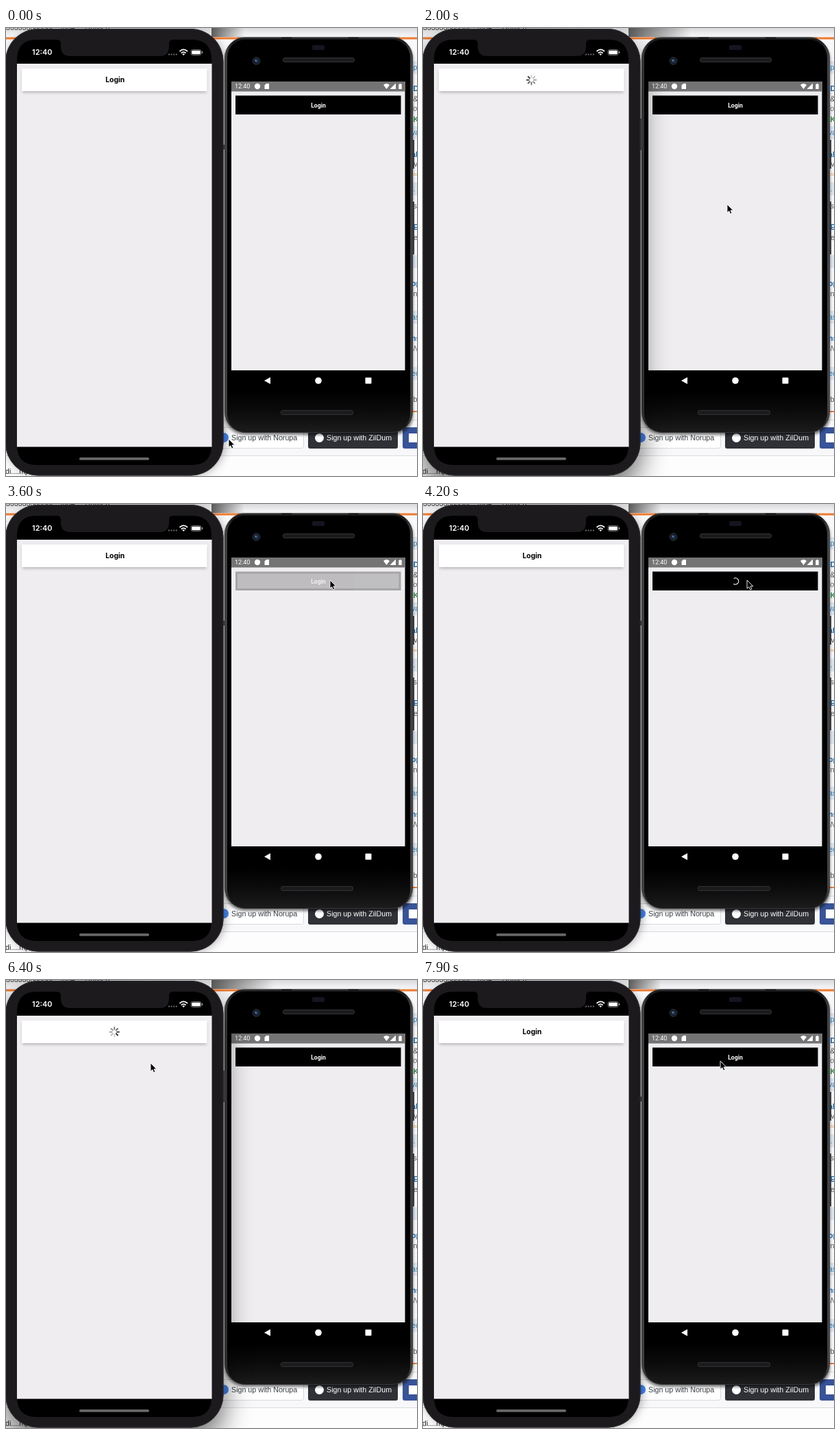
Write an HTML page that moves like this. It is 600 px wide and 653 px high and loops after 8 s.

```html
<!DOCTYPE html>
<html lang="en">
<head>
<meta charset="utf-8">
<title>Login button on two phones</title>
<style>
  html, body { margin: 0; width: 100%; height: 100%; overflow: hidden; background: #f8f8fa; }
  svg { display: block; width: 600px; height: 653px; }
  text { white-space: pre; }
  .page { font: 10.7px "Liberation Sans", Arial, sans-serif; }
  .ios { font-family: Inter, sans-serif; font-weight: 600; }
  .droid { font-family: Roboto, sans-serif; }
</style>
</head>
<body>
<svg viewBox="0 0 600 653">
  <defs>
    <filter id="wide" x="-50%" y="-30%" width="200%" height="160%"><feGaussianBlur stdDeviation="21"/></filter>
    <filter id="tight" x="-50%" y="-30%" width="200%" height="160%"><feGaussianBlur stdDeviation="8"/></filter>
    <filter id="soft" x="-20%" y="-40%" width="140%" height="200%"><feGaussianBlur stdDeviation="2.2"/></filter>
    <linearGradient id="topShade">
      <stop offset="0" stop-color="#000" stop-opacity=".6"/>
      <stop offset="1" stop-color="#000" stop-opacity="0"/>
    </linearGradient>
    <linearGradient id="strip" x2="0" y2="1">
      <stop offset="0" stop-color="#d9d9db"/>
      <stop offset=".7" stop-color="#f1f1f3"/>
    </linearGradient>
    <linearGradient id="chin" x2="0" y2="1">
      <stop offset="0" stop-color="#000"/>
      <stop offset=".5" stop-color="#0b0b0c"/>
      <stop offset="1" stop-color="#1a1a1b"/>
    </linearGradient>
    <linearGradient id="rim" x2="1" y2="0">
      <stop offset="0" stop-color="#48484a"/>
      <stop offset=".04" stop-color="#1b1b1c"/>
      <stop offset=".96" stop-color="#1b1b1c"/>
      <stop offset="1" stop-color="#4a4a4c"/>
    </linearGradient>
  </defs>

  <g class="page">
    <rect width="600" height="653" fill="#f8f8fa"/>
    <rect width="600" height="14" fill="url(#strip)"/>
    <rect y="13.5" width="600" height="3" fill="#ee7b30"/>
    <text x="0" y="3" fill="#333">3333333333di....mp4     Untitled....</text>
    <g id="column"></g>
    <rect x="590" y="558" width="10" height="2" fill="#ee7b30"/>
    <path d="M318 571.5H600" stroke="#dcdee1"/>
    <rect y="623" width="600" height="30" fill="#fdfdfe"/>
    <path d="M0 623.5H600" stroke="#d9dbdf"/>
    <rect x="300.5" y="582.5" width="134" height="30" rx="3" fill="#fff" stroke="#d6d9dc"/>
    <circle cx="318" cy="597" r="7" fill="#4285f4"/>
    <text x="329" y="601" fill="#3b4045">Sign up with Norupa</text>
    <rect x="441" y="582" width="131" height="31" rx="3" fill="#2f3136"/>
    <circle cx="457.500" cy="597.500" r="6.500" fill="#fff"/>
    <text x="468" y="601" fill="#fff">Sign up with ZilDum</text>
    <rect x="579" y="582" width="40" height="31" rx="3" fill="#385499"/>
    <rect x="588" y="591" width="13" height="13" fill="#fff"/>
    <text x="-1" y="650" fill="#222">di....mp4</text>
  </g>

  <g id="idleShade">
    <rect x="3" y="8" width="314" height="642" rx="48" filter="url(#tight)" opacity=".5"/>
    <rect x="300" width="48" height="13" fill="url(#topShade)"/>
  </g>

  <g class="droid">
    <rect x="320" y="18" width="274" height="575" rx="28" filter="url(#soft)" opacity=".55"/>
    <path d="M594.500 163V205M594.500 253V330" stroke="#3c3c3e" stroke-width="3"/>
    <rect x="319.500" y="13.500" width="274" height="576" rx="30" fill="url(#rim)" stroke="#38383a"/>
    <path d="M338 14H402M417 14H500M515 14H575" stroke="#69696b"/>
    <rect x="323" y="17" width="267" height="569" rx="26"/>
    <path d="M323 530H590V560Q590 586 564 586H349Q323 586 323 560Z" fill="url(#chin)"/>
    <rect x="447" y="25" width="18" height="7" rx="2" fill="#17141f"/>
    <circle cx="365.500" cy="48" r="5.500" fill="#17202e" stroke="#29292d"/>
    <circle cx="365.500" cy="48" r="2.200" fill="#29466f"/>
    <circle cx="364.500" cy="47" r="1" fill="#6e91bd"/>
    <g fill="#1b1b1d" stroke="#333336">
      <rect x="404.500" y="43.500" width="104" height="6" rx="2.500"/>
      <rect x="401.500" y="557.500" width="105" height="6" rx="2.500"/>
    </g>
    <rect x="329" y="78" width="253.500" height="421" fill="#efedf0"/>
    <rect x="329" y="78" width="253.500" height="14.500" fill="#757475"/>
    <g fill="#fff">
      <text x="334" y="88.300" font-size="9">12:40</text>
      <circle cx="367" cy="85" r="4.200"/>
      <path d="M380 81H384V89H377.500V83.500Z"/>
      <path d="M551 83Q555.500 79 560 83L555.500 89Z"/>
      <path d="M569 80.500V89H560.500Z"/>
      <path d="M573.300 82H574.500V81H576.500V82H577.700V89H573.300Z"/>
      <path d="M386 509V519L377 514Z"/>
      <circle cx="456" cy="514" r="4.800"/>
      <rect x="524.500" y="509.500" width="9" height="9" rx="1"/>
    </g>
    <g id="droidButton">
      <rect x="335" y="98.500" width="241.500" height="27.500"/>
      <text id="droidLabel" x="456" y="116" font-size="8.700" font-weight="700" fill="#fff" text-anchor="middle">Login</text>
      <circle id="droidSpin" cx="456" cy="112.500" r="4.700" fill="none" stroke="#fff" stroke-width="1.200"/>
    </g>
    <rect id="droidRim" x="336.500" y="100" width="238.500" height="24.500" fill="none" stroke="#000" stroke-width="3" opacity=".13"/>
  </g>

  <g id="activeShade">
    <rect x="-1" y="20" width="318" height="651" rx="50" filter="url(#wide)" opacity=".6"/>
    <rect x="300" width="92" height="13" fill="url(#topShade)"/>
    <rect x="316" y="132" width="4.500" height="46" rx="1.500" fill="#39393b"/>
  </g>

  <g class="ios">
    <rect x="316" y="170" width="4" height="7" fill="#39393b"/>
    <rect x="-1" y="1" width="318.500" height="651.500" rx="48" fill="#1c1a1d"/>
    <rect x="-.5" y="1.500" width="317.500" height="650.500" rx="47.500" fill="none" stroke="#333135"/>
    <path d="M16 52V46Q16 17 45 17H74Q80 17 80 23V27Q80 41 94 41H224Q238 41 238 27V23Q238 17 244 17H271Q300 17 300 46V608Q300 637 271 637H45Q16 637 16 608Z"/>
    <rect x="16" y="52" width="284.500" height="558.500" fill="#efedf0"/>
    <rect x="107" y="626" width="102" height="3.800" rx="1.900" fill="#69676a"/>
    <text x="38" y="39.300" font-size="11" fill="#fff">12:40</text>
    <path d="M237 38.500H250" stroke="#6b6b6b" stroke-width="2" stroke-dasharray="2 1.600"/>
    <g fill="none" stroke="#fff" stroke-width="1.700">
      <path d="M253.500 34Q259.200 28.800 265 34M255.800 36.600Q259.200 33.600 262.600 36.600"/>
    </g>
    <path d="M257.300 38Q259.200 36.400 261.100 38L259.200 40Z" fill="#fff"/>
    <rect x="270" y="31.500" width="15" height="8" rx="2.300" fill="none" stroke="#8a8a8a" stroke-width=".8"/>
    <rect x="271.200" y="32.700" width="12.600" height="5.600" rx="1.300" fill="#fff"/>
    <path d="M286.500 34V37" stroke="#aaa" stroke-width="1.200"/>
    <g id="iosButton">
      <rect x="24" y="61" width="268.500" height="33" filter="url(#soft)" opacity=".24"/>
      <rect x="23" y="59" width="270.500" height="33" fill="#fff"/>
      <text id="iosLabel" x="159.300" y="79.200" font-size="10.400" font-weight="700" text-anchor="middle">Login</text>
      <g id="iosSpin" transform="translate(158.300 75.700)" stroke-width="1.900" stroke-linecap="round"></g>
    </g>
  </g>

  <path id="cursor" d="M0 0V12.200L2.800 9.700L4.700 14L6.900 13L5 8.900H8.800Z" stroke="#fff" stroke-width=".9"/>
</svg>
<script>
const LOOP = 8000;
const $ = id => document.getElementById(id);
const show = (id, on) => $(id).setAttribute('visibility', on ? 'visible' : 'hidden');
const within = (t, spans) => spans.some(([from, to]) => t >= from && t < to);
const clamp = v => Math.max(0, Math.min(1, v));

function add(parent, tag, attrs, text = '') {
  const node = document.createElementNS('http://www.w3.org/2000/svg', tag);
  for (const key in attrs) node.setAttribute(key, attrs[key]);
  node.textContent = text;
  parent.append(node);
  return node;
}

// Clipped page text to the right of the phones: baseline, text, style.
const styles = {
  tag: { fill: '#2f7fb8' },
  link: { fill: '#0a66b5', 'font-weight': 700 },
  note: { fill: '#666', 'font-style': 'italic' },
  body: { fill: '#555' },
  good: { fill: '#2f8f45', 'font-weight': 700 },
  warm: { fill: '#f0a040' }
};
[
  [61, 'p', 'tag'], [92, 'D', 'link'], [107, '&', 'body'], [121, 'lo', 'note'],
  [137, 'K', 'good'], [156, 'va', 'tag'], [188, 'al', 'link'], [202, 'V', 'body'],
  [217, '≈', 'warm'], [238, '.', 'tag'], [263, 's', 'body'], [294, 'E', 'link'],
  [309, 'te', 'body'], [344, ' ', 'tag'], [376, 'op', 'link'], [391, 'n', 'body'],
  [425, 'as', 'tag'], [456, 'ns', 'link'], [471, 'N', 'note'], [507, 'ed', 'tag'], [545, 'b', 'body']
].forEach(([y, text, kind]) => {
  if (kind === 'tag') add($('column'), 'rect', { x: 585, y: y - 13, width: 15, height: 19, fill: '#dbe7f2' });
  add($('column'), 'text', { x: text.length > 1 ? 592 : 594.5, y, ...styles[kind] }, text);
});

const spokes = Array.from({ length: 8 }, (_, i) =>
  add($('iosSpin'), 'path', { d: 'M3.6 0H6.800', stroke: '#333', transform: `rotate(${i * 45})` }));

const path = [
  [0, 325, 599], [100, 325, 599], [850, 163, 79], [1250, 163, 79], [1900, 444, 257],
  [2800, 444, 257], [3350, 473, 111], [4950, 473, 111], [5350, 224, 93], [5450, 224, 93],
  [5600, 211, 82], [5900, 211, 82], [6200, 211, 121], [6750, 211, 121], [7100, 298, 161],
  [7250, 298, 161], [7600, 434, 118], [LOOP, 434, 118]
];

function cursorAt(t) {
  const i = path.findIndex(point => point[0] > t);
  const [t0, x0, y0] = path[i - 1], [t1, x1, y1] = path[i];
  const u = (t - t0) / (t1 - t0), k = u * u * (3 - 2 * u);
  return [x0 + (x1 - x0) * k, y0 + (y1 - y0) * k];
}

// Dims to 0.2 while held, then fades back after release.
const pressOpacity = (t, down, up, fadeIn, fadeOut) =>
  t < down ? 1 : t < up ? 1 - .8 * clamp((t - down) / fadeIn) : .2 + .8 * clamp((t - up) / fadeOut);

const focusSpans = [[990, 3350], [5550, 7800]];
const iosLoading = [[1250, 2300], [5880, 6880]];
const droidLoading = [[3720, 4690]];

function draw(t) {
  const focused = within(t, focusSpans);
  show('activeShade', focused);
  show('idleShade', !focused);

  const ios = t < 4000 ? pressOpacity(t, 980, 1100, 10, 220) : pressOpacity(t, 5550, 5680, 100, 190);
  $('iosButton').setAttribute('opacity', ios);
  const iosBusy = within(t, iosLoading);
  show('iosLabel', !iosBusy);
  show('iosSpin', iosBusy);
  const lead = Math.floor((t - 2000) / 125) + (t < 4000 ? 5 : 6) + 16;
  spokes.forEach((spoke, i) => spoke.setAttribute('opacity', 1 - ((lead - i + 80) % 8) * .11));

  const droid = pressOpacity(t, 3520, 3680, 70, 230);
  $('droidButton').setAttribute('opacity', droid);
  show('droidRim', droid < 1);
  const droidBusy = within(t, droidLoading);
  show('droidLabel', !droidBusy);
  show('droidSpin', droidBusy);
  const arc = 12 + 9 * Math.sin(t / 212);
  $('droidSpin').setAttribute('stroke-dasharray', `${arc} 30`);
  $('droidSpin').setAttribute('transform', `rotate(${t * .4 % 360} 456 112.5)`);

  $('cursor').setAttribute('transform', `translate(${cursorAt(t)})`);
}

const start = performance.now();
function tick() {
  draw((performance.now() - start) % LOOP);
  requestAnimationFrame(tick);
}
draw(0);
tick();
</script>
</body>
</html>
```
